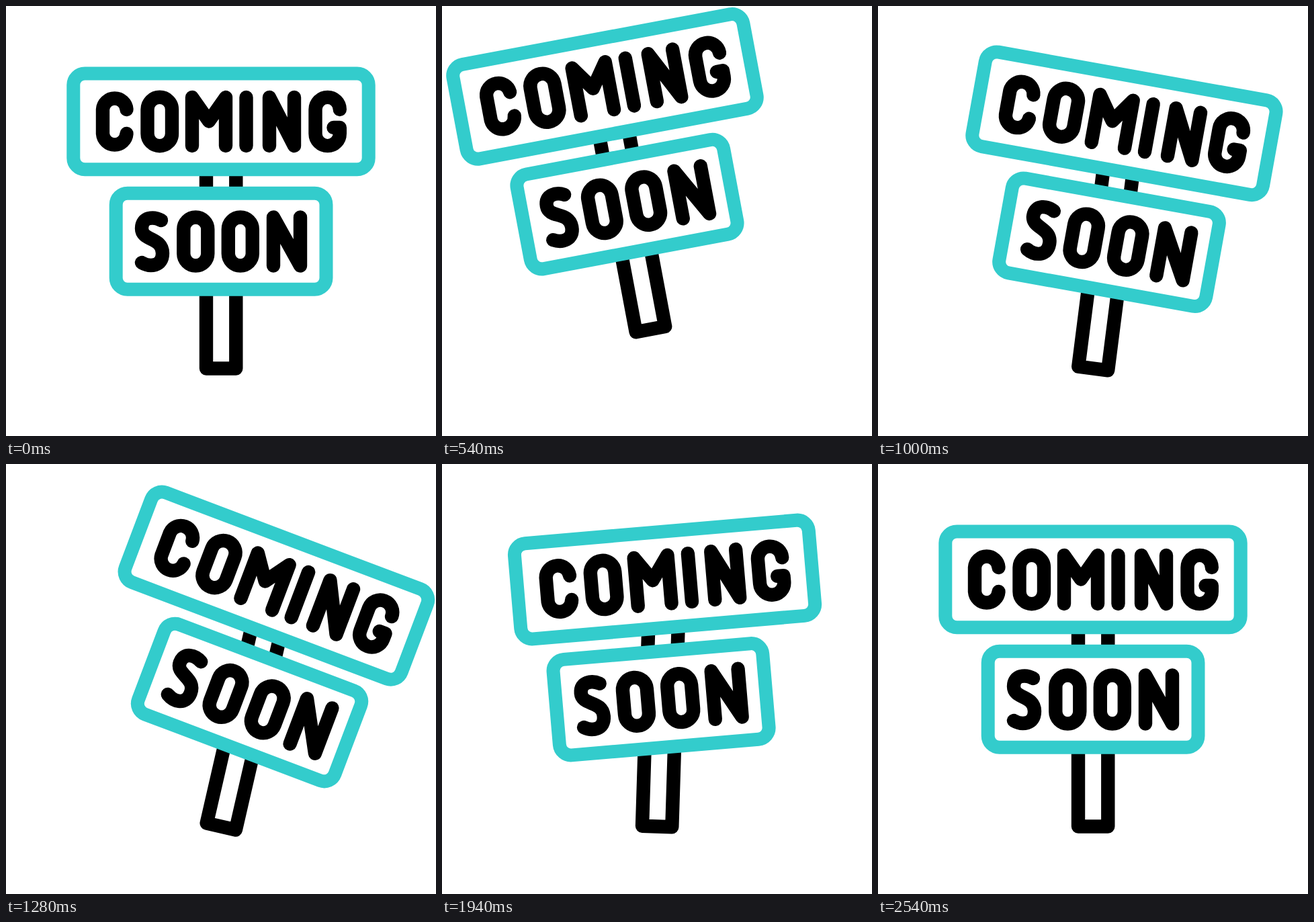
Animation of 640 by 640 pixels, one loop 3200 ms. Source, as an HTML page:

```html
<!DOCTYPE html>
<html lang="en">
<head>
<meta charset="utf-8">
<title>Coming soon</title>
<style>
  html, body { margin: 0; height: 100%; overflow: hidden; background: #fff; }
  svg { display: block; width: 100%; height: 100%; }
  path { fill: none; stroke: #000; stroke-width: 20.4; stroke-linecap: round; stroke-linejoin: round; }
  rect { fill: #fff; stroke: #33cccc; stroke-width: 20; }
</style>
</head>
<body>
<svg viewBox="0 0 640 640" role="img" aria-label="Coming soon">
  <g id="post">
    <path d="M298 180V539.5H342.3V180"/>
    <g class="sign" data-y="172">
      <rect x="100.3" y="100.5" width="439.4" height="142.7" rx="17"/>
      <path d="M179.5 154a17.8 17.8 0 0 0-35.5 0v36a17.8 17.8 0 0 0 35.5 0"/>
      <path d="M210.5 154a18.2 18.2 0 0 1 36.5 0v36a18.2 18.2 0 0 1-36.5 0z"/>
      <path d="M277 208v-72l25 35.5 25-35.5v72"/>
      <path d="M357.5 136v72"/>
      <path d="M392 208v-72l37 72v-72"/>
      <path d="M496.8 154a18.1 18.1 0 0 0-36.3 0v36a18.1 18.1 0 0 0 36.3 0v-9h-9.3"/>
    </g>
    <g class="sign" data-y="350">
      <rect x="163.7" y="278.7" width="312.8" height="143" rx="17"/>
      <path d="M231 319c-11-6-29-5.5-29 12 0 19 31 13 31 37 0 20-19 21-31 14"/>
      <path d="M264.3 332.5a18 18 0 0 1 36 0v36a18 18 0 0 1-36 0z"/>
      <path d="M330.8 332.5a18 18 0 0 1 36 0v36a18 18 0 0 1-36 0z"/>
      <path d="M398 386.5v-72l40 72v-72"/>
    </g>
  </g>
</svg>
<script>
const LOOP = 3200;
const post = document.getElementById('post');
const signs = document.querySelectorAll('.sign');

const ease = u => (1 - Math.cos(Math.PI * u)) / 2;

// Eases between turning points [time, value, skew]; a skew above 1 delays the way there.
const track = (...turns) => t => turns.reduce((value, [end, to, skew = 1], i) => {
  const start = i ? turns[i - 1][0] : end - 1;
  const u = Math.min(1, Math.max(0, (t - start) / (end - start)));
  return value + (to - value) * ease(u ** skew);
}, 0);

const lift = track([0, 0], [510, -59, 1.43], [975, 0]);
const swing = track([0, 0], [500, -10.8, 1.43], [1250, 13.2], [1690, -9], [2135, 9], [2470, 0]);
const wobble = track([760, 0], [1340, 8], [1840, -8.8], [2260, 6.8], [2540, 0]);

function draw(now) {
  const t = now % LOOP, y = lift(t);
  post.setAttribute('transform', `translate(${0.165 * y} ${y}) rotate(${swing(t)} 320 540)`);
  for (const sign of signs) {
    sign.setAttribute('transform', `rotate(${wobble(t)} 320 ${sign.dataset.y})`);
  }
  requestAnimationFrame(draw);
}
draw(0);
</script>
</body>
</html>
```
